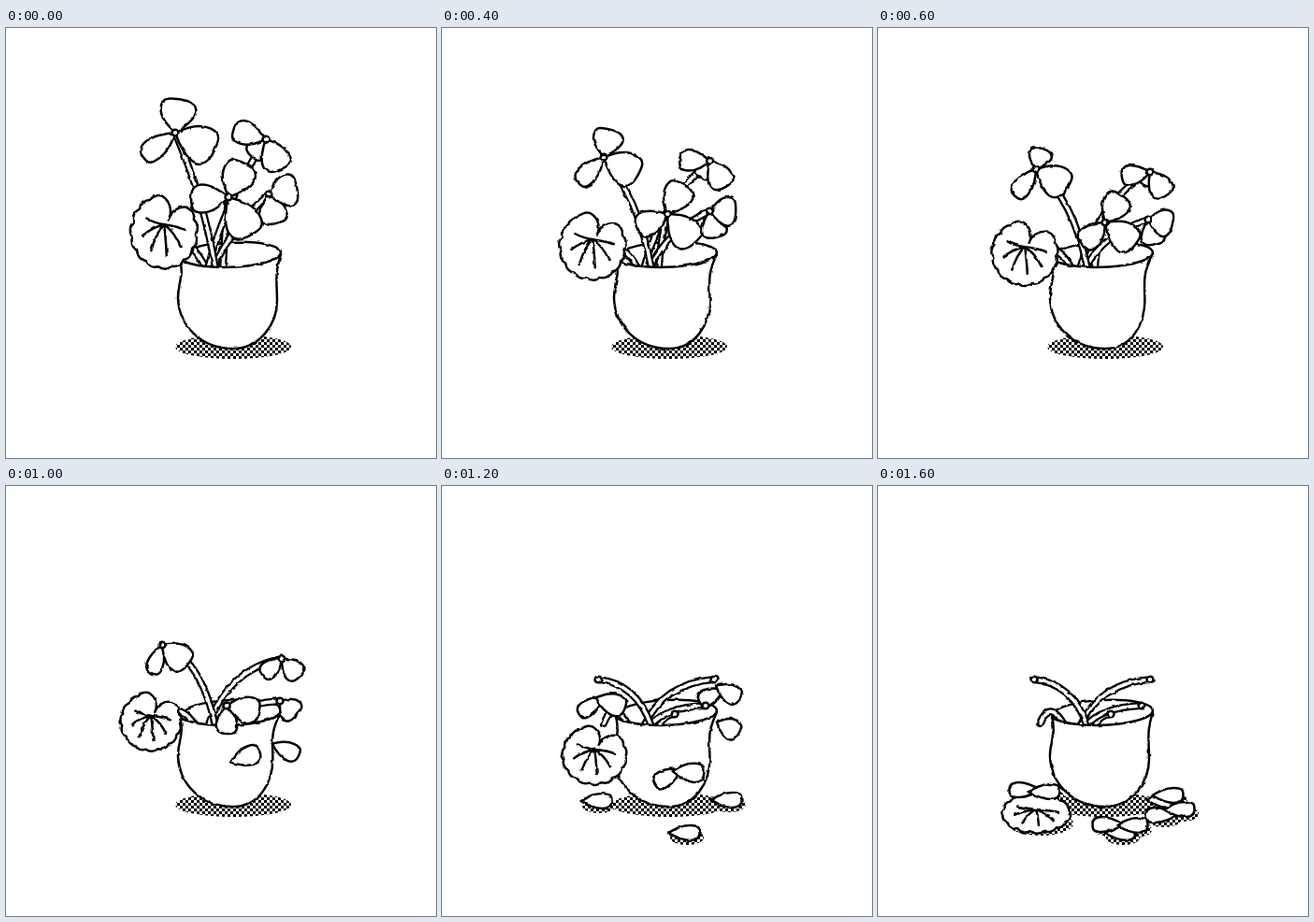
Recreate the animation shown at these times as an HTML page. Size 460 by 460 pixels, loop 1800 ms.

```html
<!DOCTYPE html>
<html lang="en">
<head>
<meta charset="utf-8">
<title>Wilting flower pot</title>
<style>
  html, body { margin: 0; width: 100%; height: 100%; overflow: hidden; background: #fff; }
  svg { display: block; width: 100vw; height: 100vh; }
  #ink { fill: #fff; stroke: #000; stroke-width: 2.5; stroke-linecap: round; stroke-linejoin: round; }
  .line { fill: none; }
  .stem { fill: none; stroke-width: 8; }
  .core { fill: none; stroke: #fff; stroke-width: 3.4; }
</style>
</head>
<body>
<svg viewBox="0 0 460 460">
  <defs>
    <pattern id="dots" width="6" height="6" patternUnits="userSpaceOnUse">
      <path d="M0 0h3v3h-3zM3 3h3v3h-3z"/>
    </pattern>
    <filter id="rough" x="0" y="0" width="460" height="460" filterUnits="userSpaceOnUse" color-interpolation-filters="sRGB">
      <feTurbulence id="grain" type="fractalNoise" baseFrequency=".12" numOctaves="2" result="noise"/>
      <feDisplacementMap in="SourceGraphic" in2="noise" scale="3" xChannelSelector="R" yChannelSelector="G"/>
    </filter>
  </defs>
  <g id="shade" fill="url(#dots)"></g>
  <g id="ink" filter="url(#rough)"></g>
</svg>
<script>
const STEP = 200, STEPS = 9;
const KEYS = [0, 3, 5, 6, 7, 8];   // steps at which tracks have a key
const WILTED = 5;                  // step at which everything hangs limp

const clamp = v => Math.max(0, Math.min(1, v));
const mix = (a, b, k) => a + (b - a) * k;
const mixAll = (a, b, k) => a.map((v, i) => mix(v, b[i], k));
const polar = (x, y, rx, ry, deg) =>
  [x + rx * Math.cos(deg * Math.PI / 180), y + ry * Math.sin(deg * Math.PI / 180)];

// Value of a track at a step; the last key holds
function track(keys, step) {
  const i = keys.findIndex((_, n) => KEYS[n + 1] > step);
  if (i < 0 || i >= keys.length - 1) return keys.at(-1);
  return mixAll(keys[i], keys[i + 1], (step - KEYS[i]) / (KEYS[i + 1] - KEYS[i]));
}

// Angles in degrees, fresh and limp; a petal falls from step `start` to `end`
const petal = (angle, limp, length, width, start = 9, end = 10, land = [0, 0], fades = false) =>
  ({ angle, limp, length, width, start, end, land, fades });

const flowers = [
  { root: 224, head: [[181, 112], [169, 151], [167, 170], [167, 207]], petals: [
    petal(-82, -60, 36, 38, 5, 6, [165, 337], true),
    petal(143, 110, 43, 23, 5, 7, [157, 325]),
    petal(25, 38, 46, 40, 5, 7, [178, 327])] },
  { root: 216, head: [[278, 119], [291, 154], [295, 185], [291, 207]], petals: [
    petal(130, 100, 24, 22, 9, 10, [0, 0], true),
    petal(197, 140, 36, 25, 5, 8, [303, 352]),
    petal(65, 45, 36, 30, 5, 8, [310, 331])] },
  { root: 222, head: [[281, 178], [289, 205], [293, 230], [282, 235]], petals: [
    petal(78, 70, 32, 30, 3, 6, [304, 336]),
    petal(-12, 40, 31, 34, 5, 8, [322, 346])] },
  { root: 232, head: [[238, 181], [243, 208], [236, 235], [249, 244]], petals: [
    petal(-65, -50, 40, 35, 3, 6, [259, 371]),
    petal(177, 90, 40, 30, 5, 6.5, [246, 362]),
    petal(60, 12, 47, 38, 5, 6.5, [272, 363])] }
];

// Leaf centre and radii
const leafTrack = [
  [169, 218, 35, 39], [157, 241, 35, 34], [155, 252, 32, 31],
  [163, 288, 34, 31], [158, 338, 37, 24], [169, 350, 37, 20]
];

const path = (d, cls = '') => `<path class="${cls}" d="${d}"/>`;
const ellipse = (x, y, rx, ry) => `<ellipse cx="${x}" cy="${y}" rx="${rx}" ry="${ry}"/>`;
const stem = (tip, bend, root) =>
  ['stem', 'core'].map(cls => path(`M${tip}Q${bend} ${root}`, cls)).join('');

// Petal centre, angle and size
function petalPose(p, head, step) {
  const held = Math.min(step, p.start);
  const wilt = clamp(held / WILTED);
  const size = p.fades ? 1 - wilt ** 2 : 1 - .25 * wilt;
  const angle = mix(p.angle, p.limp, wilt ** 1.5);
  const length = p.length * size;
  const hang = polar(...track(head, held), length / 2, length / 2, angle);
  const k = clamp((step - p.start) / (p.end - p.start));
  const flat = Math.round(angle / 180) * 180;
  return {
    at: mixAll(hang, p.land, k ** 1.5),
    angle: mix(angle, flat, k),
    length: mix(length, 33, k),
    width: mix(p.width * size, 16, k),
    landed: k === 1,
    early: p.fades || p.end <= 6
  };
}

function drawPetal({ at, angle, length, width }) {
  if (length < 2) return '';
  const shape = 'M-.5,0C-.3,-.25 -.1,-.5 .2,-.5S.5,-.3 .5,0 .4,.5 .2,.5 -.3,.25 -.5,0Z';
  const scaled = shape.replace(/(-?[\d.]+),(-?[\d.]+)/g, (_, x, y) => `${x * length},${y * width}`);
  return `<g transform="translate(${at}) rotate(${angle})">${path(scaled)}</g>`;
}

// Scalloped outline with a notch, and veins fanning out below it
function drawLeaf([x, y, rx, ry], landed) {
  const lobes = 15, notch = -68;
  const spot = (deg, r) => polar(x, y, rx * r, ry * r, deg);
  const rim = Array.from({ length: lobes }, (_, i) =>
    spot(notch + i * 360 / lobes, i ? .97 : landed ? .9 : .35));
  const outline = 'M' + rim[0] + rim.map((p, i) => {
    const q = rim[(i + 1) % lobes];
    const r = Math.hypot(q[0] - p[0], q[1] - p[1]) * .75;
    return `A${r} ${r} 0 0 1 ${q}`;
  }).join('') + 'Z';
  const hub = [x, y - ry * .2];
  let veins = '';
  for (let deg = -5; deg <= 215; deg += 44) {
    const end = spot(deg, .65);
    veins += `M${hub}Q${mix(hub[0], end[0], .6)},${mix(hub[1], end[1], .3)} ${end}`;
  }
  return path(outline) + path(veins, 'line');
}

// The right side of the pot breathes by a few pixels
function drawPot(squeeze) {
  const right = 290 - squeeze;
  return path(`M186,248C191,264 184,272 184,289C185,318 208,343 243,343
    C271,343 ${right},317 ${right},292C${right},272 ${right - 3},264 294,242
    C285,256 215,262 186,248Z`);
}

function draw(step) {
  const wilt = clamp(step / 6);
  const landed = step > 6;
  const leaf = track(leafTrack, step);
  const heads = flowers.map(f => track(f.head, step));
  const petals = flowers.flatMap(f => f.petals.map(p => petalPose(p, f.head, step)));

  const stems = flowers.map(({ root }, i) => {
    const [x, y] = heads[i];
    return stem([x, y], [mix(x, root, .72), mix(y, 256, .5 - .42 * wilt)], [root, 257]);
  });
  const leafTip = step < 6 ? leaf.slice(0, 2) : [173, 254];
  const leafStem = stem(leafTip, mixAll([196, 222], [184, 227], wilt), [mix(214, 200, wilt), 257]);

  byId('shade').innerHTML = ellipse(243, 341, 62, 13)
    + petals.filter(p => p.landed).map(({ at: [x, y] }) => ellipse(x + 3, y + 5, 18, 8)).join('')
    + (landed ? ellipse(leaf[0] + 5, leaf[1] + 11, 35, 13) : '');

  // petals that land before the leaf lie under it
  byId('ink').innerHTML = `<g transform="rotate(-3 240 243)">${ellipse(240, 243, 54, 14)}</g>`
    + leafStem + stems.reverse().join('')
    + drawPot(5 * Math.sin(Math.PI * step / 8))
    + petals.filter(p => p.early).map(drawPetal).join('')
    + drawLeaf(leaf, landed)
    + petals.filter(p => !p.early).map(drawPetal).join('')
    + heads.map(([x, y]) => ellipse(x, y, 3.5, 3.3)).join('');
  byId('grain').setAttribute('seed', step + 1);
}

const byId = id => document.getElementById(id);
let shown = -1;
function tick() {
  const step = Math.floor(performance.now() / STEP) % STEPS;
  if (step !== shown) draw(shown = step);
  requestAnimationFrame(tick);
}
tick();
</script>
</body>
</html>
```
